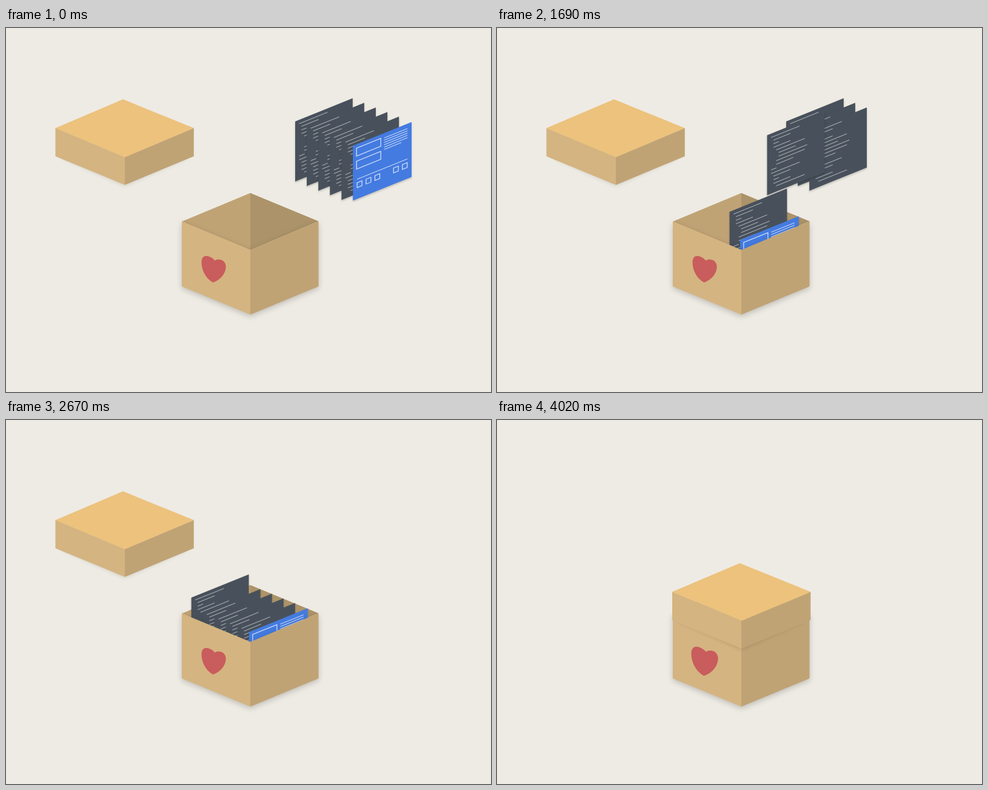
Recreate the animation shown at these times as an HTML page. Size 800 px wide and 600 px high, loop 4550 ms.

```html
<!DOCTYPE html>
<html lang="en">
<head>
<meta charset="utf-8">
<title>Packing a box</title>
<style>
  html, body { margin: 0; width: 100%; height: 100%; overflow: hidden; background: #eeebe4; }
  svg { display: block; width: 800px; height: 600px; }
  .card { filter: drop-shadow(0.5px 2px 1.5px rgba(0, 0, 0, .2)); }
  .front { filter: drop-shadow(0 3px 5px rgba(0, 0, 0, .2)); }
  .under { filter: blur(4px); opacity: .2; }
  .light { fill: #d4b481; }
  .mid { fill: #c0a375; }
  .deep { fill: #ac9369; }
  .top { fill: #ecc27d; }
</style>
</head>
<body>
<svg viewBox="0 0 800 600" xmlns="http://www.w3.org/2000/svg">
  <polygon class="mid" points="290,319 403,272 403,366"/>
  <polygon class="deep" points="403,272 515.5,318.5 403,366"/>
  <g id="cards"></g>
  <g class="front">
    <polygon class="light" points="290,318.7 403.3,365.7 403.3,472.5 290,426"/>
    <polygon class="mid" points="403,365.7 515.5,318.5 515.5,426 403,472.5"/>
  </g>
  <path id="heart" fill="#c95c5c" d="M341.5 419.5C331 414 322.5 401 322.5 386C322.5 378.5 326.5 375.6 330.5 375.8C337 376.3 341.5 380 344.5 383.5C347 381.5 351.5 381 355 382.3C360 384 362.7 388.5 362.7 394C362 406 353 415.5 341.5 419.5Z"/>
  <g id="lid">
    <polygon class="under" points="95,175 196,213 297,175 297,213 196,258 95,213"/>
    <polygon class="light" points="81.5,164.8 196.3,212.8 196.3,258.7 81.5,211.6"/>
    <polygon class="mid" points="196,212.8 309.8,164.8 309.8,211.4 196,258.7"/>
    <polygon class="top" points="81.5,165 193,117.6 309.8,165 196,213"/>
  </g>
</svg>
<script>
const LOOP = 4550;
const SLOPE = -0.404;
const $ = id => document.getElementById(id);

function add(parent, tag, attrs) {
  const el = document.createElementNS('http://www.w3.org/2000/svg', tag);
  for (const k in attrs) el.setAttribute(k, attrs[k]);
  return parent.appendChild(el);
}

function bar(parent, x, y, width, opacity) {
  add(parent, 'rect', { x, y: y - 0.5, width, height: 1, fill: '#fff', opacity });
}

function frame(parent, x, y, width, height) {
  add(parent, 'rect', { x, y, width, height, fill: 'none', stroke: '#fff', 'stroke-width': 1.2, opacity: 0.8 });
}

// Code lines as [indent, width].
const CODE = [
  [6.5, 47], [10.5, 28], [10.5, 9], [10.5, 28], [15, 47],
  [19, 28], [19, 47], [15, 47], [15, 28], [6.5, 9],
  [6.5, 47], [10.5, 28], [10.5, 9], [10.5, 28], [15, 47]
];

function drawCode(g) {
  add(g, 'rect', { width: 94.8, height: 99, fill: '#48515b' });
  CODE.forEach(([x, w], i) => bar(g, x, 6.4 + 5.94 * i, w, 0.6));
}

function drawPage(g) {
  add(g, 'rect', { width: 96.8, height: 90.5, fill: '#447be0' });
  frame(g, 6, 6.5, 40, 13);
  frame(g, 6, 28, 40, 13);
  for (let i = 0; i < 6; i++) bar(g, 51.5, 8 + 3.8 * i, i < 5 ? 38.5 : 28.5, 0.8);
  bar(g, 7, 58, 83, 0.8);
  for (const x of [7, 21.7, 36.3, 67, 81.6]) frame(g, x, 64, 8, 8);
}

const cards = [];
for (let i = 0; i < 6; i++) {
  const page = i === 5;
  const el = add($('cards'), 'g', { class: 'card' });
  const face = add(el, 'g', { transform: `matrix(1 ${SLOPE} 0 1 0 0)` });
  (page ? drawPage : drawCode)(face);
  cards.push({
    el,
    x: page ? 572.2 : 477 + 19.1 * i,
    y: page ? 194 : 154 + 7.6 * i,
    start: 1110 + 230 * (5 - i)
  });
}

const clamp = p => Math.min(1, Math.max(0, p));
const outQuart = p => 1 - (1 - p) ** 4;

// cubic-bezier(.25, .1, .25, 1), solved by bisection
function ease(p) {
  const curve = (a, b, s) => 3 * a * s * (1 - s) ** 2 + 3 * b * s * s * (1 - s) + s ** 3;
  let lo = 0, hi = 1;
  for (let i = 0; i < 24; i++) {
    const s = (lo + hi) / 2;
    if (curve(0.25, 0.25, s) < p) lo = s; else hi = s;
  }
  return p <= 0 ? 0 : p >= 1 ? 1 : curve(0.1, 1, lo);
}

const tween = (t, start, duration, fn = ease) => fn(clamp((t - start) / duration));
const move = (el, x, y) => el.setAttribute('transform', `translate(${x.toFixed(2)} ${y.toFixed(2)})`);

function draw(t) {
  // Still until 1140, then a short pause after the first step.
  if (t < 1140) t = 0;
  else if (t < 1230) t = 1140;

  for (const c of cards) {
    move(c.el, c.x - 171.3 * tween(t, c.start, 400), c.y + 155.4 * tween(t, c.start + 166, 400));
  }

  const lidX = 211.5 * tween(t, 2780, 490) - 4 * tween(t, 3150, 850);
  move($('lid'), lidX, 118.3 * tween(t, 2997, 920, outQuart));

  const s = 1 + 0.1 * tween(t, 3500, 520);
  $('heart').setAttribute('transform', `translate(342.5 397.5) scale(${s.toFixed(4)}) translate(-342.5 -397.5)`);
}

const begin = performance.now();
function tick() {
  draw((performance.now() - begin) % LOOP);
  requestAnimationFrame(tick);
}
draw(0);
requestAnimationFrame(tick);
</script>
</body>
</html>
```
